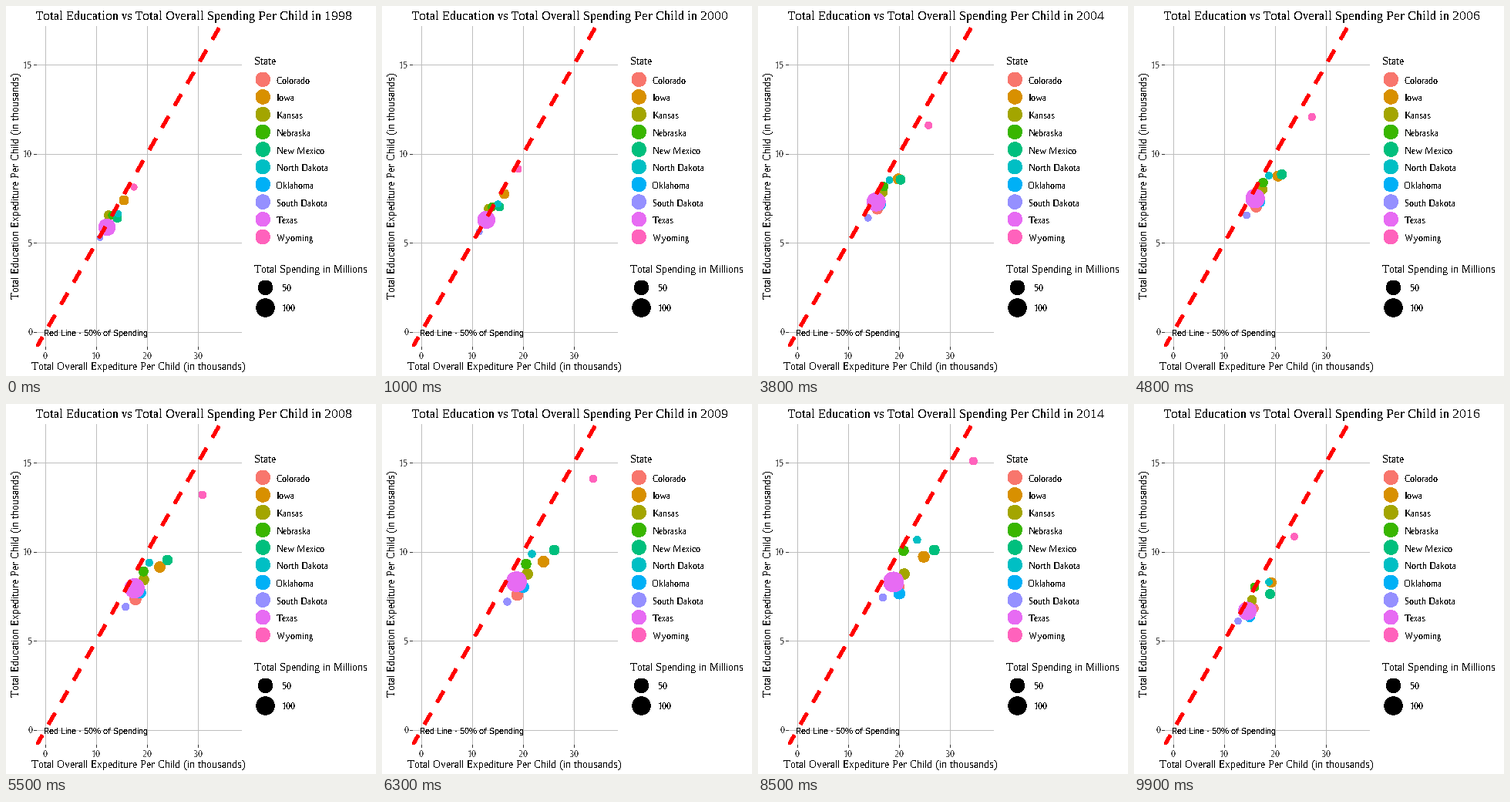
Animation of 480x480 px, one loop 10000 ms. Source, as a matplotlib script:

```python
import math

import numpy as np
import matplotlib.pyplot as plt
from matplotlib.animation import FuncAnimation
from matplotlib.patches import Circle, Rectangle

# Crisp, fully hinted lettering without smoothing
plt.rcParams.update({
    "text.antialiased": False, "text.hinting": "default",
    "text.hinting_factor": 1, "text.kerning_factor": 6,
})

SIZE = 480
DPI = 72  # one point equals one pixel
SERIF = "Liberation Serif"
FIRST, LAST = 1998, 2016
WRAP = LAST + 3  # three steps lead back to the first year

# Panel edges and axis scale in stage pixels
LEFT, RIGHT, TOP, BOTTOM = 38.5, 304.5, 26, 441.5
X0, X_UNIT = 51, 6.6
Y0, Y_UNIT = 422.8, 23.1

# Colour, first radius and stage positions at the start, the peak and the end
STATES = {
    "Colorado": ("#F8766D", 6.2, (133, 285), (175.5, 247.5), (197.5, 225)),
    "Iowa": ("#D89000", 5.9, (153, 252), (209.5, 204.5), (228, 190.5)),
    "Kansas": ("#A3A500", 5.6, (133, 271.5), (188.5, 220.5), (193, 220.5)),
    "Nebraska": ("#39B600", 5.1, (138, 271.5), (187, 207.5), (193.5, 169.5)),
    "New Mexico": ("#00BF7D", 5.4, (144.5, 275), (223.5, 189.5),
                   (240.5, 189.5)),
    "North Dakota": ("#00BFC4", 3.9, (145.5, 269.5), (194.5, 194.5),
                     (234, 154)),
    "Oklahoma": ("#00B0F6", 6, (133, 286), (183, 237.5), (184, 256)),
    "South Dakota": ("#9590FF", 3.9, (122, 300.5), (162.5, 256.5),
                     (161, 244)),
    "Texas": ("#E76BF3", 10.8, (131, 287), (174.5, 230.5), (179, 231.5)),
    "Wyoming": ("#FF62BC", 4.1, (166, 235), (274, 97), (292, 46)),
}
GROWTH = 0.2  # share by which the dots swell up to the peak

# Progress shared by all states: rise to the peak, then drift to the end
YEARS = [FIRST, 1999.75, 2002.25, 2006.33, 2009.33, 2014, LAST, WRAP]
RISE_X = [0, 0.10, 0.42, 0.60, 1, 1, 1, 0]
RISE_Y = [0, 0.17, 0.50, 0.66, 1, 1, 1, 0]
DRIFT_X = [0, 0, 0, 0, 0, 0.3, 1, 0]
DRIFT_Y = [0, 0, 0, 0, 0, 0.45, 1, 0]


def build_timeline():
    """Year value of every 100 ms step: short moves with pauses between."""
    years = [FIRST] * 2
    for i in range(LAST - FIRST):
        steps = 4 if i < 6 else 3
        years += [FIRST + i + k / steps for k in range(1, steps + 1)]
        years += [FIRST + i + 1] * 2
    return years + [LAST + 1, LAST + 2]


TIMELINE = build_timeline()

fig = plt.figure(figsize=(SIZE / DPI, SIZE / DPI), dpi=DPI, facecolor="white")
ax = fig.add_axes([0, 0, 1, 1])
ax.set_xlim(0, SIZE)
ax.set_ylim(SIZE, 0)
ax.axis("off")


def label(x, y, text, size, font=SERIF, color="black", **kw):
    return ax.text(x, y, text, fontsize=size, family=font, color=color,
                   va="baseline", **kw)


def rule(xs, ys, color, z):
    ax.plot(xs, ys, color=color, lw=1, zorder=z, antialiased=False,
            solid_capstyle="butt")


def disc(x, y, radius, color, z=2):
    return ax.add_patch(Circle((x, y), radius, fc=color, ec="none", zorder=z,
                               antialiased=False))


def draw_axes():
    for value in (0, 10, 20, 30):
        x = X0 + value * X_UNIT
        rule([x, x], [TOP, BOTTOM], "#BEBEBE", 1)
        rule([x, x], [BOTTOM, BOTTOM + 3], "#333333", 1)
        label(x, 458, str(value), 12, color="#4D4D4D", ha="center")
    for value in (0, 5, 10, 15):
        y = Y0 - value * Y_UNIT
        rule([LEFT, RIGHT], [y, y], "#BEBEBE", 1)
        rule([LEFT - 3, LEFT], [y, y], "#333333", 1)
        label(34.3, y + 4.5, str(value), 12, color="#4D4D4D", ha="right")
    label(172, 472, "Total Overall Expediture Per Child (in thousands)", 14,
          ha="center")
    label(17.5, 233.5, "Total Education Expediture Per Child (in thousands)",
          14, rotation=90, rotation_mode="anchor", ha="center")


def draw_half_line():
    xs = np.array([LEFT + 0.3, RIGHT])
    line, = ax.plot(xs, Y0 - (xs - X0) * Y_UNIT / X_UNIT / 2, color="red",
                    lw=3.6, zorder=4, dashes=(4.5, 4.5),
                    dash_capstyle="butt", antialiased=False)
    line.set_clip_path(Rectangle((LEFT, TOP), RIGHT - LEFT, BOTTOM - TOP,
                                 transform=ax.transData))
    label(49.3, 428, "Red Line - 50% of Spending", 11, "Liberation Sans",
          zorder=5)


def draw_legends():
    label(322, 76, "State", 14)
    for i, (name, (color, *_)) in enumerate(STATES.items()):
        y = 95.2 + 22.7 * i
        disc(333.2, y, 9.2, color)
        label(350.7, y + 5.5, name, 12)
    label(322, 346, "Total Spending in Millions", 14)
    for y, radius, text in ((365.3, 9.2, "50"), (391.5, 11.7, "100")):
        disc(336.5, y, radius, "black")
        label(358, y + 5, text, 12)


draw_axes()
draw_half_line()
draw_legends()
title = label(244.2, 18, "", 17, ha="center")
dots = {name: disc(0, 0, 1, state[0], 3) for name, state in STATES.items()}


def update(frame):
    year = TIMELINE[frame]
    shown = min(math.floor(year + 0.5), LAST)
    title.set_text("Total Education vs Total Overall Spending "
                   f"Per Child in {shown}")
    rise = np.array([np.interp(year, YEARS, p) for p in (RISE_X, RISE_Y)])
    drift = np.array([np.interp(year, YEARS, p) for p in (DRIFT_X, DRIFT_Y)])
    for name, dot in dots.items():
        _, radius, *points = STATES[name]
        start, peak, end = map(np.array, points)
        dot.center = start + rise * (peak - start) + drift * (end - peak)
        dot.set_radius(radius * (1 + GROWTH * rise[0]))
    return [title, *dots.values()]


anim = FuncAnimation(fig, update, frames=len(TIMELINE), interval=100,
                     repeat=True, repeat_delay=0)
plt.show()
```
